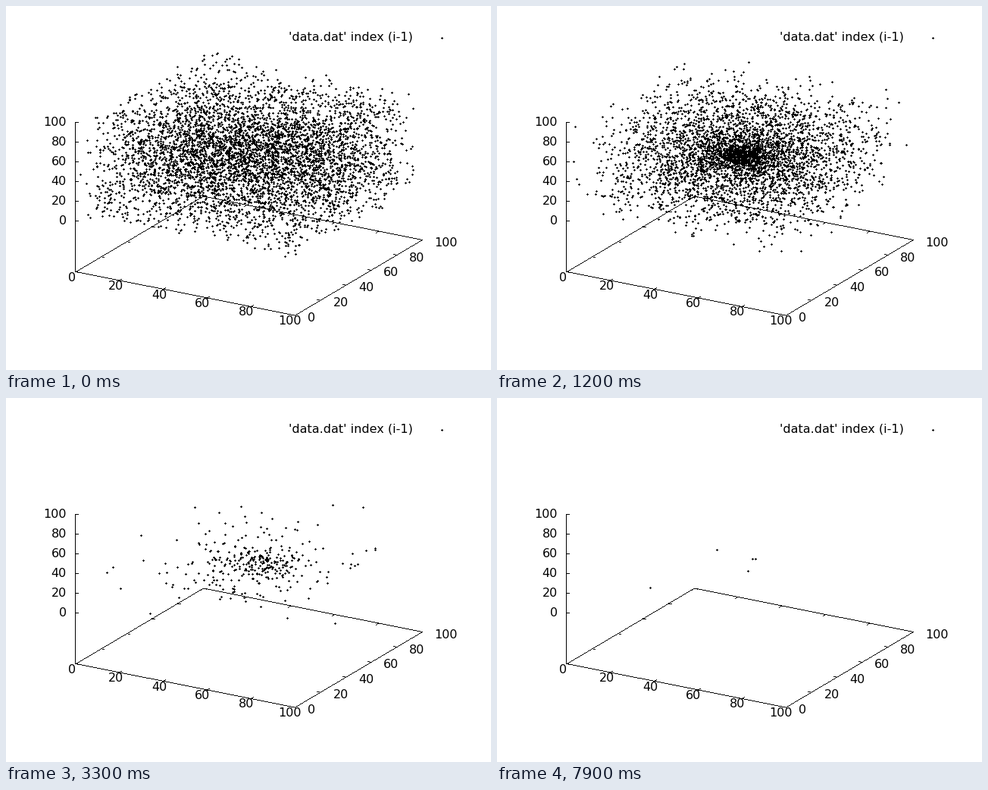
Write a matplotlib script that moves like this. It is 640 px wide and 480 px high and loops after 8 s.

```python
import numpy as np
import matplotlib.pyplot as plt
from matplotlib.animation import FuncAnimation

W, H, DPI = 640, 480, 100
FRAMES, STEP = 80, 100
COUNT, BOUND = 5400, 680

plt.rcParams.update({"font.family": "DejaVu Sans", "font.size": 16 * 72 / DPI})

# Oblique view of the 0..100 cube, lifted above its base plane
ORIGIN = np.array([92, 283])
VIEW = np.array([[2.89, 0.575], [1.68, -0.995], [0, -1.3]])
CORNER = np.array([91.5, 350])
SIDE_X, SIDE_Y = 100 * VIEW[:2]
LOBE = np.array([12, 12, -4])

rng = np.random.default_rng(7)


def unit(v):
    return v / np.linalg.norm(v, axis=1, keepdims=True)


def ease(t, a, b):
    x = np.clip((t - a) / (b - a), 0, 1)
    return x * x * (3 - 2 * x)


# Uniform cloud with two denser lobes
lobe = rng.choice([-1, 0, 1], COUNT, p=[0.1, 0.8, 0.1])[:, None]
start = np.where(lobe == 0, rng.uniform(-49, 49, (COUNT, 3)),
                 lobe * LOBE + rng.normal(0, 17, (COUNT, 3)).clip(-35, 35))
scatter = rng.normal(0, 3.6, (COUNT, 3)) + lobe * LOBE

# Infall towards the centre, outer points arriving last
radius = np.linalg.norm(start, axis=1)
arrive = 7 + 11.5 * (radius / 86) ** 3.3
arrive *= rng.normal(1, 0.05, COUNT).clip(0.85, 1.15)
arrive[:BOUND] = np.minimum(arrive[:BOUND], 10)

# Most points shoot through and leave the box
away = unit(-unit(start) + rng.normal(0, 0.35, (COUNT, 3)))
speed = rng.uniform(9, 18, COUNT)

# The rest stay bound and thin out
axis_a = unit(rng.normal(size=(BOUND, 3)))
axis_b = unit(rng.normal(size=(BOUND, 3)))
size = np.minimum(rng.gamma(2, 18, BOUND), 70)
omega = rng.uniform(0.12, 0.3, BOUND)
rank = np.arange(BOUND)
life = 13 + 26 * np.log(BOUND / (rank + 0.5)) ** (1 / 1.7)
size = np.where(life > 55, np.minimum(size, 36), size)


def orbit(t):
    phase = omega * np.maximum(t - arrive[:BOUND], 0)
    pos = axis_a * (size * np.sin(phase))[:, None]
    pos += axis_b * (0.35 * size * (1 - np.cos(phase)))[:, None]
    return pos + np.array([3, 0, -14]) * ease(t, 8, 35)


def points(t):
    fall = start * (1 - np.minimum(t / arrive, 1) ** 2)[:, None]
    fly = away * (speed * np.maximum(t - arrive, 0))[:, None]
    fly[:BOUND] = orbit(t)
    passed = (t > arrive)[:, None]
    pos = np.where(passed, fly, fall) + scatter * min(t / 8, 1) ** 2
    seen = np.abs(pos).max(axis=1) <= 50
    seen[:BOUND] &= t < life
    return ORIGIN + (pos[seen] + 50) @ VIEW


def line(img, a, b):
    a, b = np.array(a), np.array(b)
    n = int(np.abs(b - a).max()) + 1
    x, y = np.floor(np.linspace(a, b, n) + 0.5).astype(int).T
    img[y, x, 3] = 255


def dot(img, xy):
    x, y = np.rint(xy).astype(int).T
    for dx, dy in ((0, 0), (1, 0), (-1, 0), (0, 1), (0, -1)):
        img[y + dy, x + dx, 3] = 255


def axes_image():
    img = np.zeros((H, W, 4), np.uint8)
    line(img, (91, 350), (91, 153))
    # Each side is drawn twice, front and back, with ticks pointing inwards
    for side, other, tick in ((SIDE_X, SIDE_Y, (3, -2)),
                              (SIDE_Y, SIDE_X, (4, 1))):
        far = CORNER + other
        line(img, CORNER, CORNER + side)
        line(img, far, far + side)
        for k in np.linspace(0, 1, 6):
            line(img, CORNER + k * side, CORNER + k * side + tick)
            line(img, far + k * side, far + k * side - tick)
    for k in range(6):
        line(img, (91, 283 - 26 * k), (95, 283 - 26 * k))
    dot(img, np.array([[575, 42]]))
    return img


BASE = axes_image()


def draw(t):
    img = BASE.copy()
    dot(img, points(t))
    return img


fig = plt.figure(figsize=(W / DPI, H / DPI), dpi=DPI, facecolor="white")
ax = fig.add_axes([0, 0, 1, 1])
picture = ax.imshow(draw(0), extent=(0, W, H, 0), interpolation="nearest")
ax.set(xlim=(0, W), ylim=(H, 0), aspect="auto")
ax.axis("off")


def label(x, y, text, ha):
    ax.text(x, y, text, ha=ha, va="baseline", color="black")


for i in range(6):
    name = str(20 * i)
    label(80, 288 - 26 * i, name, "right")
    label(87.2 + 57.4 * i, 363 + 11.3 * i, name, "center")
    label(398 + 33.4 * i, 415.6 - 19.7 * i, name, "left")
label(536.5, 46, "'data.dat' index (i-1)", "right")


def update(n):
    picture.set_data(draw(n))
    return [picture]


anim = FuncAnimation(fig, update, frames=FRAMES, interval=STEP,
                     repeat=True, repeat_delay=0, blit=False)
plt.show()
```
